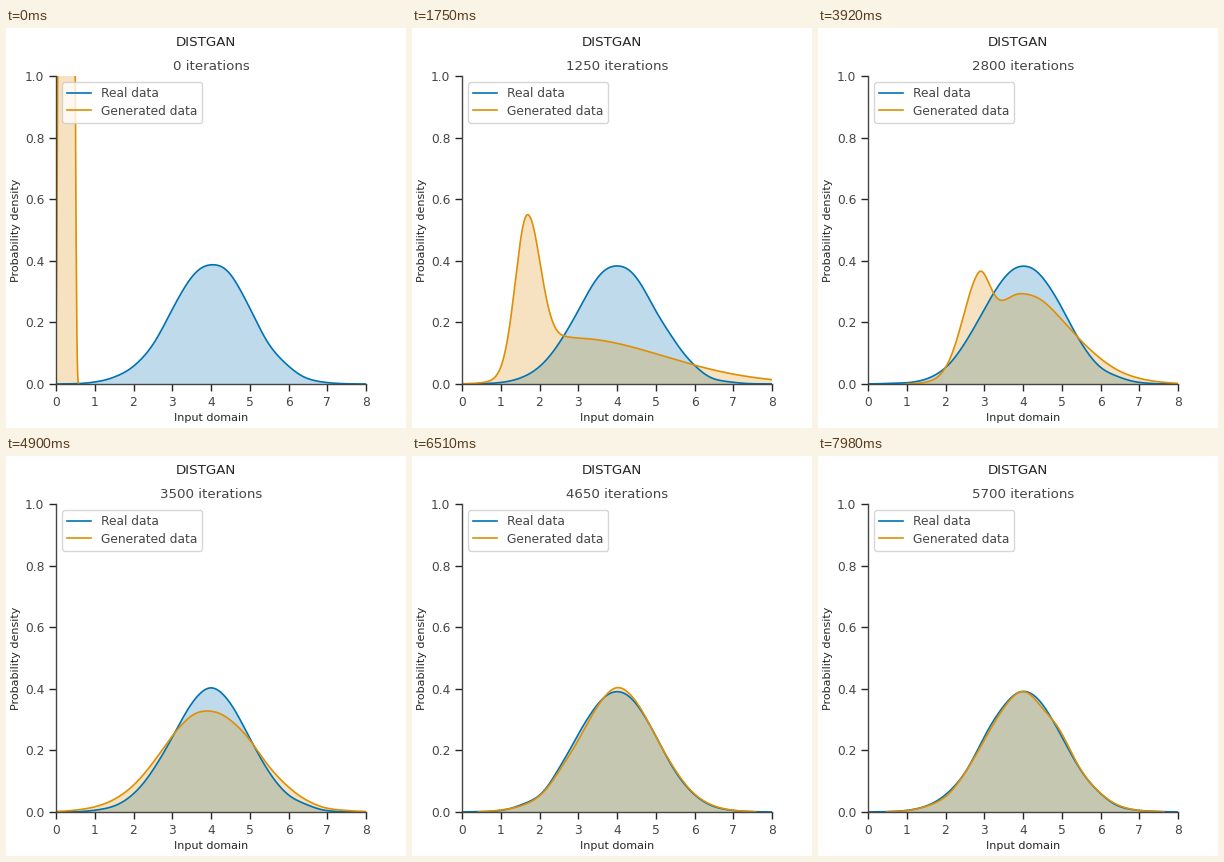
A matplotlib script that plays this animation: 400x400 px, repeating every 8000 ms.

```python
import numpy as np
import matplotlib.pyplot as plt
from matplotlib.animation import FuncAnimation

LOOP, TICK, STEP = 8000, 20, 70      # ms: loop, drawing interval, data step
ITERS = 50                           # iterations per data step
BLUE, ORANGE, INK, SOFT = "#0173b2", "#de8f05", "0.15", "0.27"

plt.rcParams.update({
    "font.family": "DejaVu Sans", "font.size": 9.6,
    "text.color": SOFT, "axes.labelcolor": INK, "axes.edgecolor": SOFT,
    "xtick.color": INK, "ytick.color": INK,
    "xtick.labelcolor": SOFT, "ytick.labelcolor": SOFT,
    "axes.linewidth": 1, "axes.labelsize": 8, "axes.labelpad": 3,
    "axes.titlesize": 9.6, "axes.titlepad": 4.5,
    "xtick.labelsize": 8.8, "ytick.labelsize": 8.8, "legend.fontsize": 8.8,
    "xtick.major.size": 4.8, "ytick.major.size": 4.8,
    "xtick.major.width": 1, "ytick.major.width": 1,
    "lines.linewidth": 1.2,
})

x = np.linspace(-4, 20, 2401)        # wider than the axes, so areas are complete
knots = np.arange(0, 8.1, 0.5)
bumps = np.exp(-0.5 * ((x[:, None] - knots) / 0.25) ** 2)


def hump(weight, centre, left, right, power=2):
    """Two-sided bell whose area is the given weight."""
    z = np.abs(x - centre) / np.where(x < centre, left, right)
    y = np.exp(-0.5 * z ** power)
    return weight * y / (y.sum() * (x[1] - x[0]))


def resample(y, seed, amount):
    """Add the smooth sampling noise of a density estimate."""
    noise = bumps @ np.random.default_rng(seed).normal(size=len(knots))
    return np.maximum(y + amount * np.sqrt(y) * noise, 0)


def real_density(step):
    return resample(hump(1, 4, 1.02, 1.02), 1000 + step, 0.01)


def fake_density(step):
    # mass flows from a sharp peak that drifts right into a broad bulk
    bulk = np.interp(step, [0, 15, 37, 56, 70], [0, 0.5, 0.74, 0.79, 1])
    centre = np.interp(step, [0, 15, 37, 93], [0.8, 1.9, 3.9, 4.03])
    left = np.interp(step, [15, 37, 56, 70, 93], [0.45, 1.35, 0.85, 1.22, 1.02])
    right = np.interp(step, [15, 37, 56, 93], [1.05, 4, 1.3, 1.02])
    width = np.interp(step, [0, 15, 37, 56], [0.21, 0.14, 0.49, 0.42])
    skew = max(min(1 + 0.02 * step, 1.52 - 0.015 * step), 0.5)
    power = max(2, 6.7 - 0.31 * step)
    y = hump(bulk, centre, left, right)
    y += hump(1 - bulk, 0.27 + 0.1255 * step ** 0.75, width, width * skew, power)
    return resample(y, 5000 + step, np.interp(step, [40, 75], [0, 0.01]))


fig, ax = plt.subplots(figsize=(4, 4), dpi=100, facecolor="white")
fig.subplots_adjust(left=0.125, right=0.9, bottom=0.11, top=0.88)
fig.suptitle("DISTGAN", fontsize=9.6, color=INK)
ax.set(xlim=(0, 8), ylim=(0, 1), xticks=range(9),
       yticks=np.linspace(0, 1, 6), xlabel="Input domain",
       ylabel="Probability density")
ax.spines[["top", "right"]].set_visible(False)
title = ax.set_title("")


def add_curve(color, label):
    line, = ax.plot([], [], color=color, label=label)
    area, = ax.fill([0, 0, 0], [0, 0, 0], color=color, alpha=0.25, lw=0)
    return line, area


real = add_curve(BLUE, "Real data")
fake = add_curve(ORANGE, "Generated data")
ax.legend(loc="upper left", labelspacing=0.38)


def set_curve(curve, y, floor=0):
    line, area = curve
    line.set_data(x, np.where(y < floor, np.nan, y))
    area.set_xy(np.column_stack([np.r_[x[0], x, x[-1]], np.r_[0, y, 0]]))


def update(frame):
    step = (frame * TICK + TICK // 2) // STEP
    set_curve(real, real_density(step))
    set_curve(fake, fake_density(step), 0.0008)
    title.set_text(f"{step * ITERS} iterations")
    return [*real, *fake, title]


anim = FuncAnimation(fig, update, frames=LOOP // TICK, interval=TICK,
                     init_func=lambda: update(0), repeat=True, repeat_delay=0)
plt.show()
```
